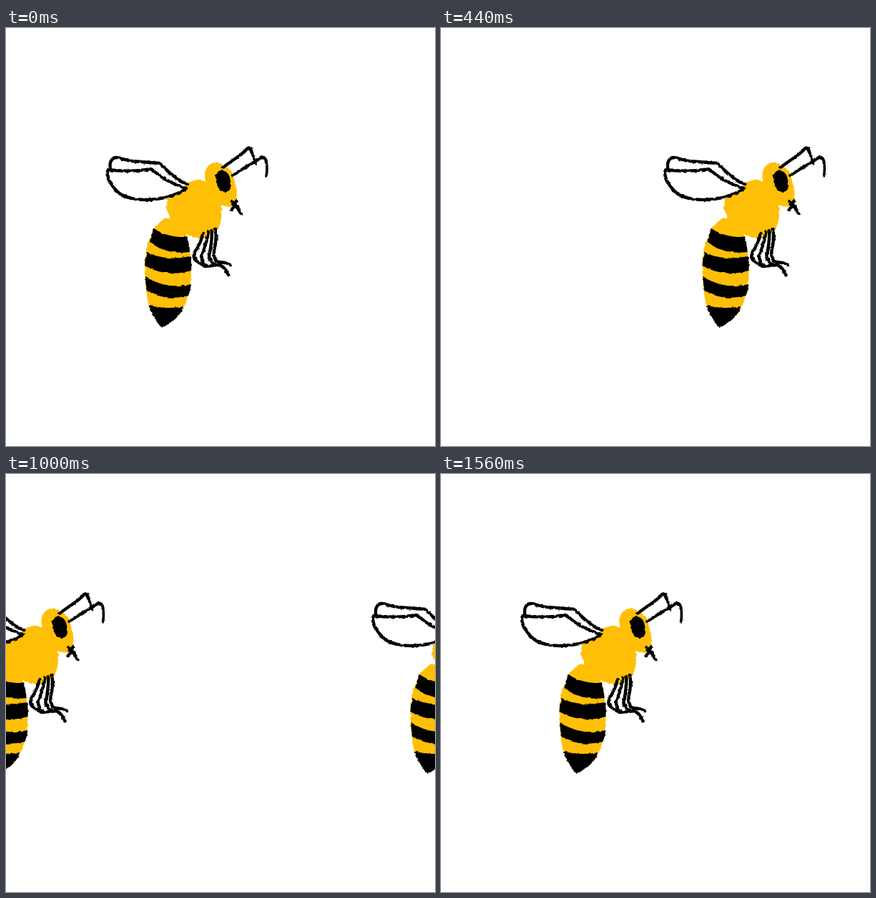
Recreate the animation shown at these times as an HTML page. Size 600 by 584 pixels, loop 1640 ms.

```html
<!DOCTYPE html>
<html lang="en">
<head>
<meta charset="utf-8">
<title>Flying bee</title>
<style>
  html, body { margin: 0; width: 100%; height: 100%; overflow: hidden; background: #fff; }
  svg { display: block; width: 600px; height: 584px; }
  .line { fill: none; stroke: #000; stroke-width: 4.4; stroke-linecap: round; stroke-linejoin: round; }
  .tip { stroke-width: 3.6; }
  .yellow { fill: #ffbf06; }
</style>
</head>
<body>
<svg viewBox="0 0 600 584">
  <defs>
    <filter id="ink" filterUnits="userSpaceOnUse" x="130" y="155" width="245" height="275" color-interpolation-filters="sRGB">
      <feTurbulence type="fractalNoise" baseFrequency="0.2" numOctaves="2" seed="4"/>
      <feDisplacementMap in="SourceGraphic" scale="3.2" xChannelSelector="R" yChannelSelector="G"/>
    </filter>
    <g id="bee" filter="url(#ink)">
      <g class="yellow">
        <path d="M279 214C275 198 283 188 294 188Q301 189 305 193Q315 195 318 207L323 229Q325 249 314 250Q307 250 301 247Q303 264 298 278Q286 294 269 294Q258 292 249 287L229 264L228 261Q220 248 229 234Q244 229 251 221Q260 209 278 214Z"/>
        <path d="M230 264Q213 269 207 281Q194 304 194 332Q194 363 200 390L218 419Q242 407 249 389Q260 365 259 333Q258 306 252 289L262 270Z"/>
      </g>
      <path d="M207 280Q225 293 253 292Q257 302 257 313Q224 317 201 299Q203 288 207 280Z"/>
      <path d="M197 313Q221 326 258 319Q260 329 259 339Q224 349 194 332Q194 322 197 313Z"/>
      <path d="M195 347Q223 366 259 358Q258 367 255 374Q221 382 197 367Q195 357 195 347Z"/>
      <path d="M199 387Q222 394 249 389Q241 408 218 419Q206 407 199 387Z"/>
      <path d="M293 209Q293 199 301 199Q310 199 313 209Q316 221 313 226Q309 231 302 228Q294 223 293 209Z"/>
      <g class="line">
        <path d="M146 197C144 186 149 181 154 181C162 181 166 186 177 186L215 189Q232 206 244 214L254 218"/>
        <path d="M143 198Q173 202 203 197L216 207Q230 217 252 224Q238 235 211 239Q179 243 160 232C149 224 138 206 143 198Z"/>
        <path d="M303 195L317 185Q331 176 338 168Q342 166 344 174"/>
        <path class="tip" d="M344 174L349 189"/>
        <path d="M317 206L334 195Q345 190 355 182Q362 178 364 187"/>
        <path class="tip" d="M364 187Q366 197 364 207"/>
        <path d="M316 242L322 248L329 260M322 242L316 254M317 247L324 250"/>
        <path d="M276 287Q271 303 265 312Q260 321 267 326L278 333L299 331Q307 335 311 345"/>
        <path d="M283 285Q280 303 274 316Q272 324 279 332"/>
        <path d="M288 283Q288 302 284 318Q284 326 294 331"/>
        <path d="M293 281Q295 296 291 311Q290 326 298 327L306 328L314 331"/>
      </g>
    </g>
  </defs>
  <g id="flight">
    <use href="#bee"/>
    <use href="#bee" x="-600"/>
  </g>
</svg>
<script>
  const LOOP = 1640, STEP = 80, LEAD = 40;
  const STRIDE = 600 / 21;
  const flight = document.getElementById('flight');
  const start = performance.now();

  function draw(now) {
    const t = Math.max(0, now - start) % LOOP;
    const step = Math.floor((t + LEAD) / STEP);
    flight.setAttribute('transform', `translate(${(step * STRIDE).toFixed(2)} 0)`);
    requestAnimationFrame(draw);
  }
  draw(start);
</script>
</body>
</html>
```
